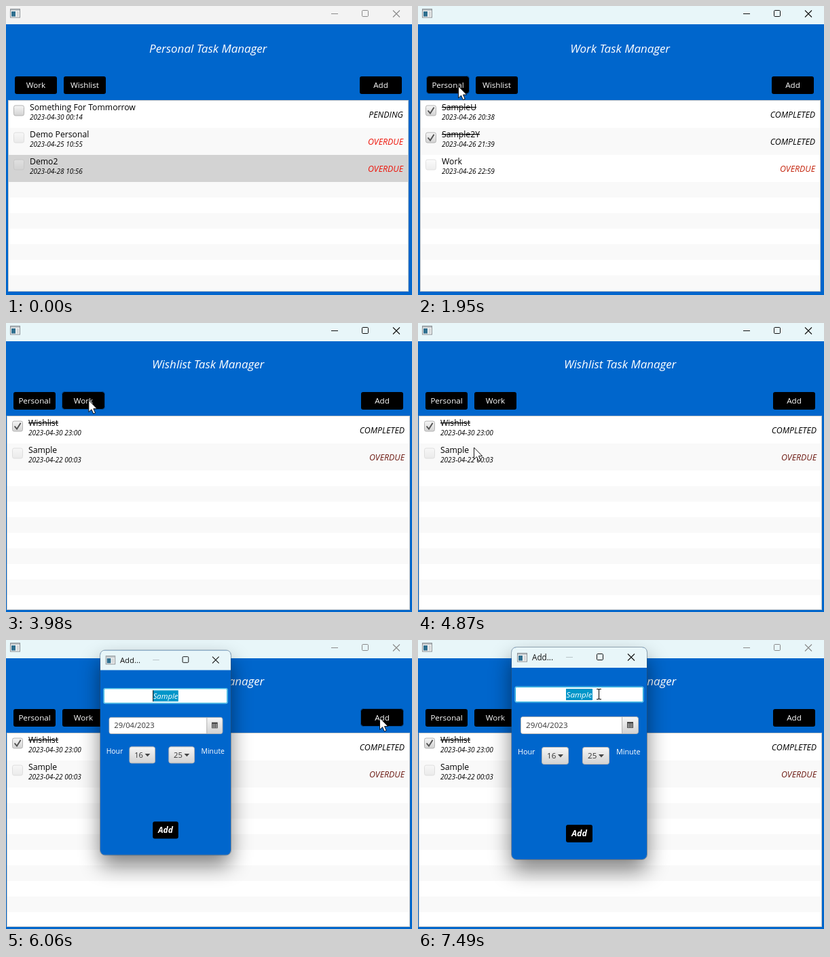
Animation, 598 px wide and 427 px high, one loop 8 s. Source, as an HTML page:

```html
<!DOCTYPE html>
<html lang="en">
<head>
<meta charset="utf-8">
<title>Task Manager</title>
<style>
  html, body { margin: 0; width: 100%; height: 100%; overflow: hidden; background: #0066cc; }
  svg { display: block; width: 598px; height: 427px; }
  text { font-family: "Open Sans", "Noto Sans", sans-serif; white-space: pre; }
</style>
</head>
<body>
<svg id="stage" viewBox="0 0 598 427" xmlns="http://www.w3.org/2000/svg">
  <defs>
    <linearGradient id="face" x1="0" y1="0" x2="0" y2="1">
      <stop offset="0" stop-color="#f6f6f6"/>
      <stop offset="1" stop-color="#d2d2d2"/>
    </linearGradient>
    <filter id="shade" x="-40%" y="-30%" width="180%" height="170%">
      <feGaussianBlur stdDeviation="16"/>
    </filter>
  </defs>
</svg>
<script>
const NS = 'http://www.w3.org/2000/svg';
const LOOP = 8000;
const BLUE = '#0066cc';
const stage = document.getElementById('stage');

function add(parent, tag, attrs = {}, content) {
  const node = document.createElementNS(NS, tag);
  for (const key in attrs) node.setAttribute(key, attrs[key]);
  if (content !== undefined) node.textContent = content;
  parent.appendChild(node);
  return node;
}
const group = (parent, attrs) => add(parent, 'g', attrs);
const rect = (parent, x, y, width, height, fill, more) =>
  add(parent, 'rect', { x, y, width, height, fill, ...more });
const text = (parent, x, y, size, fill, content, more) =>
  add(parent, 'text', { x, y, 'font-size': size, fill, ...more }, content);
const line = (parent, d, stroke, width = 1) =>
  add(parent, 'path', { d, fill: 'none', stroke, 'stroke-width': width });

const ITALIC = { 'font-style': 'italic' };
const MIDDLE = { 'text-anchor': 'middle' };

function windowIcon(parent, x, y) {
  const g = group(parent, { transform: `translate(${x} ${y})` });
  rect(g, 0.5, 0.5, 14, 12.5, '#f4f4f4', { stroke: '#8d9296' });
  rect(g, 1, 1, 13, 2, '#b9c0c4');
  rect(g, 2, 4, 6, 7.5, '#2f6f8f');
  rect(g, 9.5, 4, 3.5, 7.5, '#d4d8da');
}

// Minimise, maximise and close marks.
function windowMarks(parent, xMin, xMax, xClose, y, minStroke) {
  line(parent, `M${xMin} ${y}h10`, minStroke || 'currentColor');
  add(parent, 'rect', { x: xMax, y: y - 5, width: 9, height: 9, rx: 1.2, fill: 'none', stroke: 'currentColor' });
  line(parent, `M${xClose} ${y - 5}l10 10m0 -10l-10 10`, 'currentColor', 1.1);
}

// Returns the button's area and its two faces, so that hovering can swap them.
function button(parent, x, y, label) {
  const idle = rect(parent, x, y, 62, 26, '#000', { rx: 3 });
  const hover = rect(parent, x - 0.5, y - 0.5, 63, 26, '#000', { rx: 4, stroke: '#0050a2' });
  text(parent, x + 31, y + 17, 11.6, '#fff', label, MIDDLE);
  return { x, y, idle, hover };
}

function checkbox(parent, x, y, done, enabled) {
  const g = group(parent, { transform: `translate(${x} ${y})`, opacity: enabled ? 1 : 0.38 });
  rect(g, 0.5, 0.5, 15, 15, 'url(#face)', { rx: 2.5, stroke: '#b4b4b4' });
  if (done) line(g, 'M3.6 8l3.4 4.2l5.6 -9', '#505050', 1.9);
}

// grow pushes the content outwards by that many pixels.
function makeView({ from, name, tabs, tasks, grow, red }) {
  const node = group(stage);
  const left = 3 - grow, top = 139 - grow, width = 590 + 2 * grow, height = 283 + 2 * grow;
  const bottom = top + height - 1;
  text(node, 297.7, 69 - grow, 17, '#fff', `${name} Task Manager`, { ...ITALIC, ...MIDDLE });
  const buttons = tabs.map((tab, i) => button(node, 13 - grow + 72 * i, 104 - grow, tab));
  buttons.push(button(node, 521 + grow, 104 - grow, 'Add'));

  rect(node, left, top, width, height, '#c8c8c8');
  let y = top + 1;
  for (let i = 0; y < bottom; i++) {
    const task = tasks[i];
    const rowHeight = Math.min(task ? 40 : 23, bottom - y);
    const fill = task && task.selected ? '#d3d3d3' : i % 2 ? '#f9f9f9' : '#fff';
    rect(node, left + 1, y, width - 2, rowHeight, fill);
    if (task) {
      const done = task.state === 'COMPLETED';
      const late = task.state === 'OVERDUE';
      checkbox(node, 11 - grow, y + 6.5, done, !late);
      text(node, 35 - grow, y + 14, 12.2, '#000', task.title, done ? { 'text-decoration': 'line-through' } : {});
      text(node, 35 - grow, y + 28, 10.05, '#000', task.due, ITALIC);
      text(node, 585 + grow, y + 25, 12.4, late ? red : '#000', task.state, { ...ITALIC, 'text-anchor': 'end' });
    }
    y += rowHeight;
  }
  return { from, node, buttons };
}

const task = (title, due, state, selected) => ({ title, due, state, selected });

rect(stage, 0, 0, 598, 427, BLUE);
const bar = rect(stage, 0, 0, 598, 27, '#f3f3f3');
windowIcon(stage, 6, 4);
const marks = group(stage);
windowMarks(marks, 479, 524.5, 570, 11.5);

const views = [
  {
    from: 0, name: 'Personal', tabs: ['Work', 'Wishlist'], grow: 0, red: '#ee1409',
    tasks: [
      task('Something For Tommorrow', '2023-04-30 00:14', 'PENDING'),
      task('Demo Personal', '2023-04-25 10:55', 'OVERDUE'),
      task('Demo2', '2023-04-28 10:56', 'OVERDUE', true)
    ]
  },
  {
    from: 1950, name: 'Work', tabs: ['Personal', 'Wishlist'], grow: 0, red: '#c4240c',
    tasks: [
      task('SampleU', '2023-04-26 20:38', 'COMPLETED'),
      task('Sample2Y', '2023-04-26 21:39', 'COMPLETED'),
      task('Work', '2023-04-26 22:59', 'OVERDUE')
    ]
  },
  {
    from: 3360, name: 'Wishlist', tabs: ['Personal', 'Work'], grow: 2, red: '#6e1c14',
    tasks: [
      task('Wishlist', '2023-04-30 23:00', 'COMPLETED'),
      task('Sample', '2023-04-22 00:03', 'OVERDUE')
    ]
  }
].map(makeView);

function combo(parent, x, value) {
  rect(parent, x + 0.5, 158.5, 39, 25, 'url(#face)', { rx: 3, stroke: '#b4b4b4' });
  text(parent, x + 8, 175, 11.6, '#333', value);
  add(parent, 'path', { d: `M${x + 24} 169h8l-4 4.5z`, fill: '#444' });
}

function makeDialog() {
  const g = group(stage);
  rect(g, 138, 27, 199, 313, '#000', { rx: 8, opacity: 0.5, filter: 'url(#shade)' });
  rect(g, 138, 11, 199, 313, BLUE, { rx: 7 });
  add(g, 'path', { d: 'M138 41V18q0 -7 7 -7H330q7 0 7 7V41z', fill: '#e8f6f9' });
  rect(g, 137.5, 10.5, 200, 314, 'none', { rx: 7.5, stroke: '#35506b', 'stroke-opacity': 0.45 });
  windowIcon(g, 146, 19);
  text(g, 168, 30, 11.7, '#111', 'Add...');
  windowMarks(group(g, { color: '#111' }), 218, 263.5, 309, 25.5, '#b9c4c8');

  rect(g, 142.5, 68.5, 190, 24, '#8fdcf5', { rx: 3 });
  rect(g, 143.5, 69.5, 188, 22, '#fff', { rx: 2, stroke: '#14a8dc' });
  rect(g, 218, 72, 39, 17, '#0096c9');
  text(g, 237.5, 85, 11.6, '#fff', 'Sample', { ...ITALIC, ...MIDDLE });
  const caret = rect(g, 218, 72, 1, 17, '#111');

  rect(g, 151.5, 113.5, 173, 25, 'url(#face)', { rx: 3, stroke: '#b4b4b4' });
  add(g, 'path', { d: 'M300 114H154q-2 0 -2 2v20q0 2 2 2H300z', fill: '#fff' });
  line(g, 'M300.5 114v24', '#b4b4b4');
  text(g, 159, 130, 11.6, '#333', '29/04/2023');
  rect(g, 308, 121, 9, 9, '#444');
  for (let i = 0; i < 9; i++) rect(g, 309 + (i % 3) * 2.6, 123.6 + Math.floor(i / 3) * 2.1, 1.7, 1.2, '#ddd');

  text(g, 147, 169, 10.8, '#fff', 'Hour');
  text(g, 292, 169, 10.8, '#fff', 'Minute');
  combo(g, 182, '16');
  combo(g, 242, '25');
  rect(g, 218, 273, 39, 26, '#000', { rx: 3 });
  text(g, 237.5, 290, 12.5, '#fff', 'Add', { ...ITALIC, ...MIDDLE, 'font-weight': 700 });
  return { node: g, caret };
}
const dialog = makeDialog();

const arrow = add(stage, 'path', {
  d: 'M0 0V17.4L4.1 13.7L6.8 20L9.7 18.8L7 12.6H12.2Z',
  fill: '#fff', stroke: '#000', 'stroke-width': 0.9, 'stroke-linejoin': 'round'
});
const beam = line(stage, 'M-3.5 -7.5h2.5l1 1l1 -1h2.5M0 -6.5v13M-3.5 7.5h2.5l1 -1l1 1h2.5', '#111', 1.1);

// Pointer stops: time, x, y.
const path = [
  [190, 519, 394], [400, 330, 200], [600, 130, 84], [700, 82, 99], [800, 59.5, 118.5],
  [2040, 59.5, 118.5], [2490, 123.5, 111],
  [3920, 123.5, 111], [4300, 108, 140], [4720, 84, 180], [4870, 82.5, 184],
  [4940, 95, 191], [5150, 280, 150], [5350, 450, 95], [5430, 500, 86], [5570, 527, 108], [5640, 550.5, 115],
  [6130, 550.5, 115], [6400, 453, 118], [6600, 330, 110], [6800, 300, 95],
  [7000, 270, 92], [7130, 268, 71], [7220, 268, 80], [7290, 266.5, 80]
];

function pointerAt(t) {
  const next = path.findIndex(stop => stop[0] > t);
  if (next < 0) return path[path.length - 1].slice(1);
  if (next === 0) return path[0].slice(1);
  const [t0, x0, y0] = path[next - 1];
  const [t1, x1, y1] = path[next];
  const p = (t - t0) / (t1 - t0);
  return [x0 + (x1 - x0) * p, y0 + (y1 - y0) * p];
}

const show = (node, on) => node.setAttribute('display', on ? 'inline' : 'none');
const clamp = v => Math.max(0, Math.min(1, v));
const mix = (a, b, p) => `rgb(${a.map((v, i) => Math.round(v + (b[i] - v) * p))})`;

function draw(t) {
  // The picture advances in steps of 70 ms.
  const tick = t < 40 ? 0 : t - (t - 40) % 70;
  const [x, y] = pointerAt(tick);

  const focus = clamp((tick - 950) / 420);
  bar.setAttribute('fill', mix([243, 243, 243], [232, 246, 249], focus));
  marks.setAttribute('color', mix([138, 138, 138], [16, 16, 16], t < 5850 ? focus : 0));

  views.forEach((view, i) => {
    const next = views[i + 1];
    show(view.node, t >= view.from && (!next || t < next.from));
    for (const b of view.buttons) {
      const over = t >= 190 && x >= b.x && x < b.x + 62 && y >= b.y && y < b.y + 26;
      show(b.idle, !over);
      show(b.hover, over);
    }
  });

  const open = t >= 6000;
  const p = clamp((tick - 5962) / 240);
  const scale = 1 - 0.1 * (1 - p) ** 2;
  show(dialog.node, open);
  dialog.node.setAttribute('opacity', Math.min(1, p * 2.5));
  dialog.node.setAttribute('transform', `translate(166 139) scale(${scale}) translate(-166 -139)`);
  show(dialog.caret, Math.floor((t - 5990) / 500) % 2 === 0 && t < 7490);

  const overField = open && x > 143 && x < 332 && y > 69 && y < 93;
  show(arrow, t >= 190 && !overField);
  show(beam, overField);
  for (const node of [arrow, beam]) node.setAttribute('transform', `translate(${x} ${y})`);
}

const start = performance.now();
function frame() {
  draw((performance.now() - start) % LOOP);
  requestAnimationFrame(frame);
}
frame();
</script>
</body>
</html>
```
